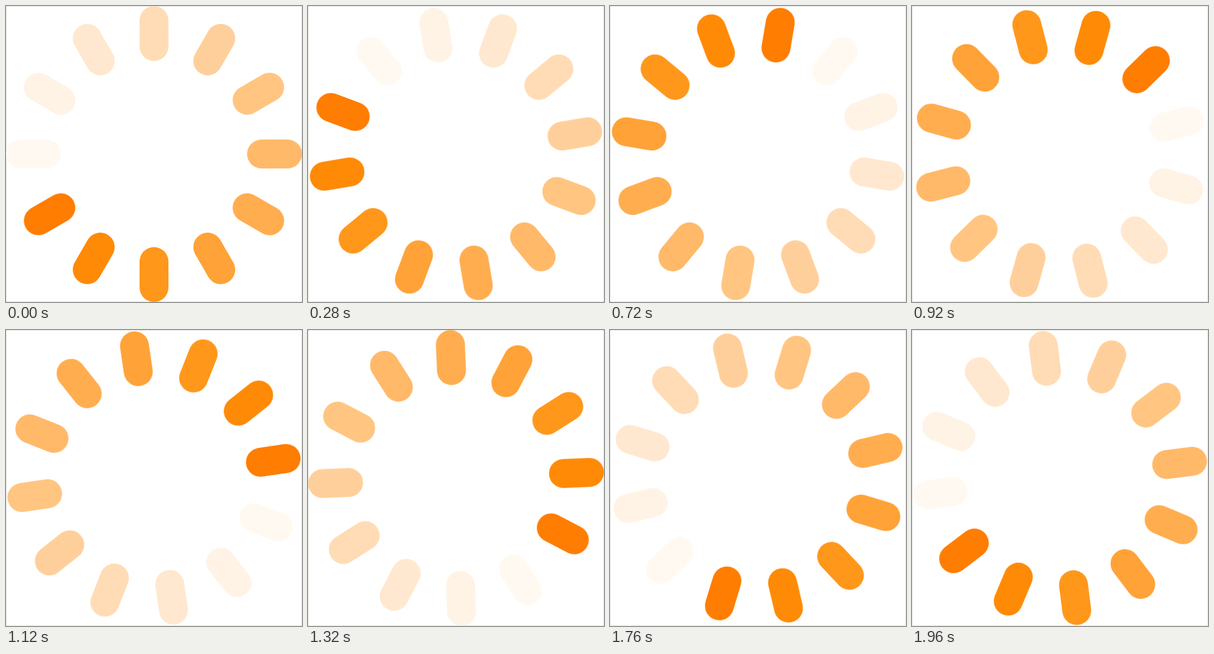
An HTML page that plays this animation: 512 px wide and 512 px high, repeating every 2000 ms.

```html
<!DOCTYPE html>
<html lang="en">
<head>
<meta charset="utf-8">
<title>Loading spinner</title>
<style>
  html, body { margin: 0; width: 100%; height: 100%; overflow: hidden; background: #fff; }
  svg { display: block; width: 100vw; height: 100vh; }
  line { stroke-width: 50; stroke-linecap: round; }
  #wheel { transform-origin: 0 0; }
</style>
</head>
<body>
<svg viewBox="0 0 512 512">
  <rect x=".5" y=".5" width="511" height="511" fill="#fff" stroke="#e0e0e0"/>
  <g transform="translate(256 256)"><g id="wheel"></g></g>
</svg>
<script>
  const LOOP = 2000, STEPS = 50, HEAD_ANGLE = 150;
  // Head first, fading counter-clockwise.
  const colors = [
    '#ff7d00', '#ff8a05', '#ff971b', '#ffa237', '#ffad4f', '#ffb969',
    '#ffc581', '#ffcf9b', '#ffdcb5', '#ffe8cf', '#fff3e6', '#fff9f2'
  ];
  const wheel = document.getElementById('wheel');

  colors.forEach((color, i) => {
    const bar = document.createElementNS('http://www.w3.org/2000/svg', 'line');
    bar.setAttribute('x1', 186);
    bar.setAttribute('x2', 231);
    bar.setAttribute('stroke', color);
    bar.setAttribute('transform', `rotate(${HEAD_ANGLE - i * 30})`);
    wheel.append(bar);
  });

  wheel.animate(
    { transform: ['rotate(0deg)', 'rotate(360deg)'] },
    { duration: LOOP, iterations: Infinity, easing: `steps(${STEPS})` }
  );
</script>
</body>
</html>
```
